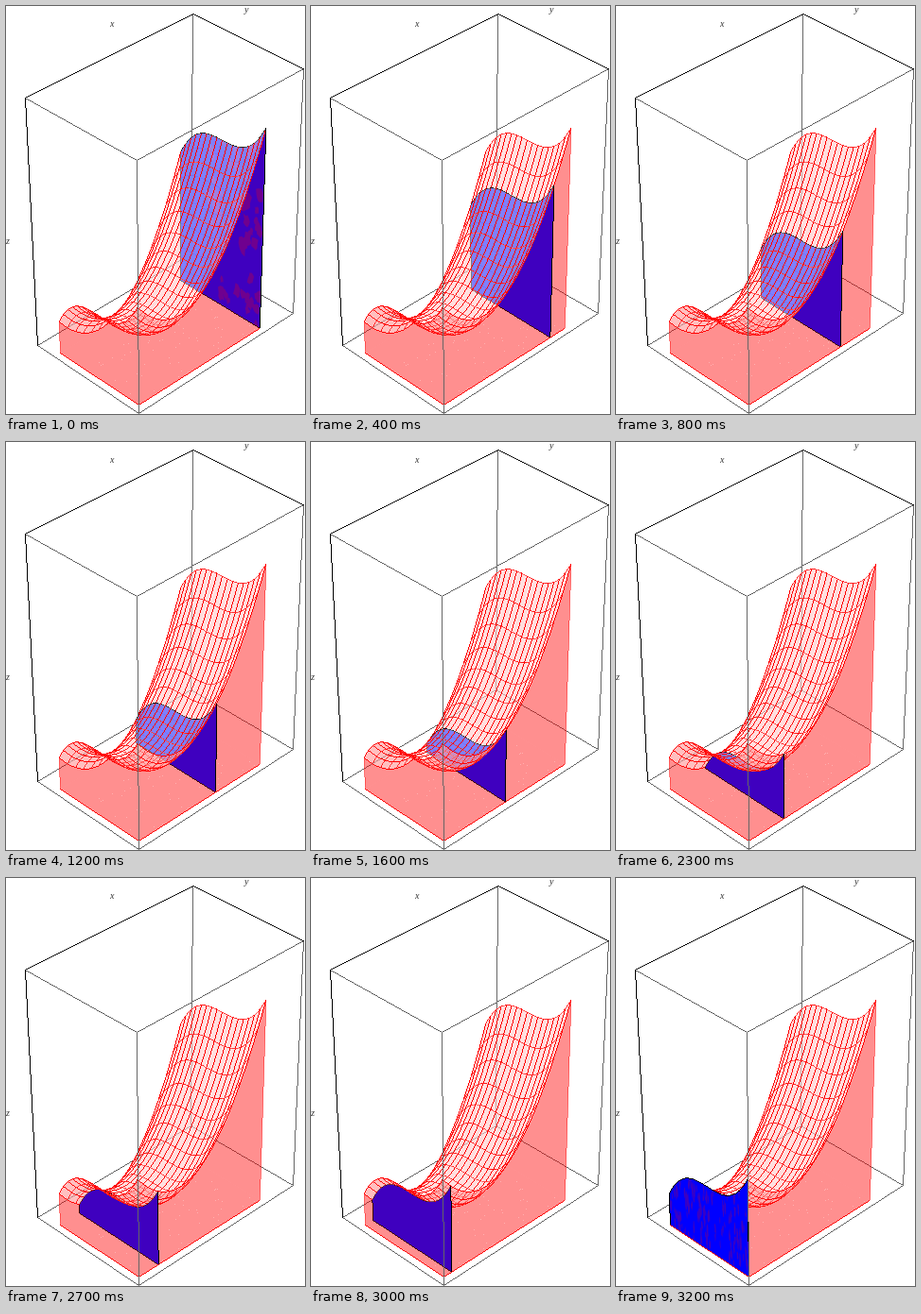
A matplotlib script for the animation above (3.3 s loop, 316x432 px).

```python
import numpy as np
import matplotlib.pyplot as plt
from matplotlib.animation import FuncAnimation
from matplotlib.collections import PolyCollection
from matplotlib.patches import Polygon

W, H, DPI = 316, 432, 100
N = 32                      # grid cells per side, one slice position per grid line
RED, BLUE, PURPLE, GRAY = "#ff0000", "#0000ff", "#4000bf", "#666666"

fig = plt.figure(figsize=(W / DPI, H / DPI), dpi=DPI, facecolor="white")
ax = fig.add_axes([0, 0, 1, 1])
ax.set_xlim(-0.5, W - 0.5)
ax.set_ylim(H - 0.5, -0.5)
ax.axis("off")


def height(s, t):
    """z = 1 + x^2 + y^3 over x in [-1, 2], y in [-1, 1]."""
    return 1 + (3 * s - 1) ** 2 + (2 * t - 1) ** 3


def project(s, t, z):
    """Perspective view of the unit floor (s, t) at height z, in pixels."""
    s, t, z = np.broadcast_arrays(s, t, z)
    d = 1 + 0.036 * s - 0.03 * t - 0.0113 * z
    x = 57 + 133.62 * s + 78.8 * t - 2.006 * z
    y = 367 - 66.56 * s + 42.34 * t - 36.99 * z
    return np.stack([x / d, y / d], axis=-1)


def wall(s, t):
    top = project(s, t, height(s, t))
    base = project(s, t, 0 * (s + t))
    return np.concatenate([top, base[::-1]])


def fill(points, color, alpha, z):
    return ax.add_patch(Polygon(points, closed=True, facecolor=color, alpha=alpha,
                                edgecolor="none", lw=0, zorder=z))


def trace(a, b):
    """Pixels of a hard one-pixel segment, one per step of its longer axis."""
    d = b - a
    m = np.argmax(np.abs(d))
    lo, hi = sorted((a[m], b[m]))
    k = np.arange(np.ceil(lo), np.floor(hi) + 1)
    return np.rint(a + ((k - a[m]) / d[m])[:, None] * d)


def squares(pixels):
    corner = np.array([(-0.5, -0.5), (0.5, -0.5), (0.5, 0.5), (-0.5, 0.5)])
    return np.unique(pixels, axis=0)[:, None, :] + corner


def raster(paths):
    paths = [np.asarray(p, float) for p in paths]
    return squares(np.concatenate([trace(a, b) for p in paths
                                   for a, b in zip(p[:-1], p[1:])]))


def dots(verts, color, z, alpha=1.0):
    return ax.add_collection(PolyCollection(verts, facecolors=color, alpha=alpha,
                                            edgecolors="none", linewidths=0,
                                            zorder=z))


def lines(paths, color, z, alpha=1.0):
    return dots(raster(paths), color, z, alpha)


u = np.linspace(0, 1, N + 1)

# Bounding box: left, back, right and front corners
top = [(20, 97), (197, 8), (314, 66), (138, 163)]
low = [(33, 359), (195, 262), (303, 325), (140, 431)]
lines([(top[1], low[1]), (low[0], low[1], low[2])], GRAY, 0)
lines([(top[0], top[3], top[2], low[2]), (top[3], low[3]),
       (low[0], low[3], low[2])], GRAY, 50)
lines([(low[0], top[0], top[1], top[2])], "black", 51)

for x, y, name in [(110.5, 19, "x"), (254, 4, "y"), (1, 249, "z")]:
    ax.text(x, y, name, family="Liberation Serif", style="italic",
            size=7.2, color="#333333", ha="center", va="center", zorder=52)

# Translucent solid: floor and back walls, then front walls
corners = project(np.array([0, 1, 1, 0]), np.array([0, 0, 1, 1]), 0)
fill(corners, RED, 0.25, 1)
fill(wall(u, 0 * u), RED, 0.25, 1)
fill(wall(0 * u + 1, u), RED, 0.25, 1)
fill(wall(u, 0 * u + 1), RED, 0.25, 40)
fill(wall(0 * u, u), RED, 0.25, 41)

# Bright specks on the floor
rng = np.random.default_rng(2)
specks = project(rng.uniform(0, 1, 60), rng.uniform(0.3, 1, 60), 0)
dots(squares(np.rint(specks)), "white", 1.2, 0.7)

lines([corners[[0, 3, 2]]], RED, 45)
lines([project(s, s, np.array([0, height(s, s)])) for s in (0, 1)], RED, 39, 0.5)

# Upper surface in strips, far to near
S, T = np.meshgrid(u, u, indexing="ij")
G = project(S, T, height(S, T))
lines([G[N]], RED, 1.4)
for i in range(N):
    fill(np.concatenate([G[i], G[i + 1][::-1]]), "white", 0.5, 33 - i)
    mesh = [G[i:i + 2, j] for j in range(0, N + 1, 2)]
    if i % 2 == 0:
        mesh.append(G[i])
    lines(mesh, RED, 33 - i + 0.2)

# Moving slice
body = fill(wall(0 * u, u), BLUE, 1, 2)
rim = lines([G[0]], "black", 2)
side = lines([G[0]], "black", 43)


def blotches(s, count, t_min, t_size, z_size, seed):
    """Irregular spots where the slice lies in the plane of an end wall."""
    rng = np.random.default_rng(seed)
    ang = np.linspace(0, 2 * np.pi, 10, endpoint=False)
    shapes = []
    for _ in range(count):
        t = rng.uniform(t_min, 1)
        z = rng.uniform(0, height(s, t))
        r = rng.uniform(0.5, 1.3, ang.size) * rng.uniform(0.5, 1.2)
        shapes.append(project(s, t + t_size * r * np.cos(ang),
                              z + z_size * r * np.sin(ang)))
    spots = dots(shapes, PURPLE, 1.55 if s else 42.05)
    spots.set_clip_path(Polygon(wall(0 * u + s, u), transform=ax.transData))
    return spots


far_spots = blotches(1, 60, 0.35, 0.045, 0.22, 4)
near_spots = blotches(0, 120, 0.0, 0.011, 0.2, 9)


def update(k):
    j = N - k
    s = u[j]
    z = 33 - j + 0.5 if j else 42
    floor = project(s, u, 0)
    body.set_xy(wall(0 * u + s, u))
    body.set_zorder(z)
    rim.set_verts(raster([G[j], floor[[0, -1]], (floor[0], G[j, 0])]))
    rim.set_zorder(z + 0.1)
    side.set_verts(raster([(floor[-1], G[j, -1])]))
    far_spots.set_visible(k == 0)
    near_spots.set_visible(k == N)
    return body, rim, side, far_spots, near_spots


anim = FuncAnimation(fig, update, frames=N + 1, interval=100, repeat=True,
                     repeat_delay=0, blit=False)
plt.show()
```
